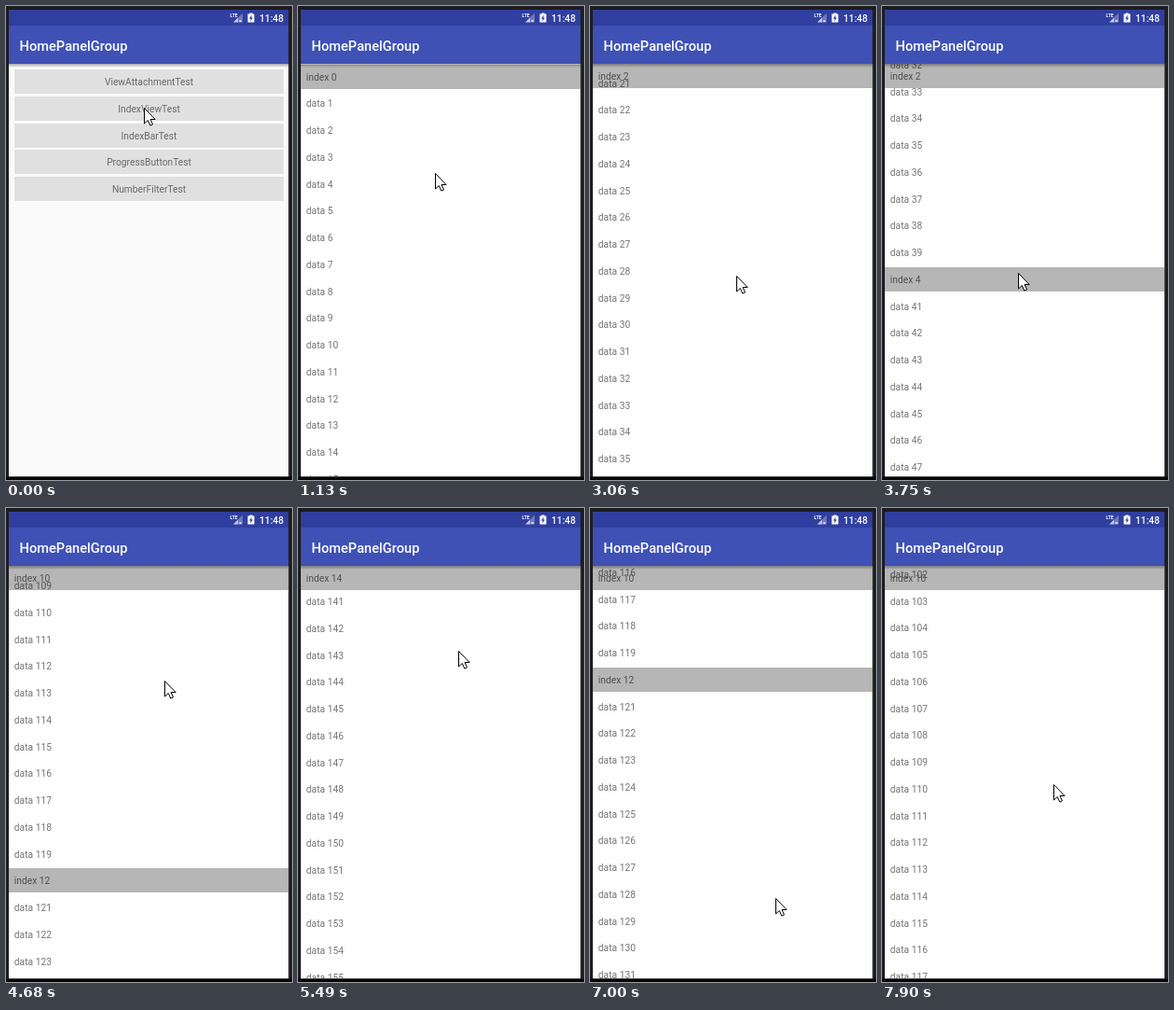
Recreate the animation shown at these times as an HTML page with a canvas. Size 307 by 508 pixels, loop 8000 ms.

```html
<!DOCTYPE html>
<html lang="en">
<head>
<meta charset="utf-8">
<title>Sticky index list</title>
<style>
  html, body { margin: 0; width: 100%; height: 100%; overflow: hidden; background: #1d1c20; }
  canvas { display: block; }
</style>
</head>
<body>
<canvas id="stage" width="307" height="508"></canvas>
<script>
const ctx = document.getElementById('stage').getContext('2d');
const LOOP = 8000, LEFT = 3, RIGHT = 303.5, TOP = 62, BOTTOM = 504.5, WIDTH = RIGHT - LEFT;
const PITCH = 28.75, ROW = 26, GROUP = 20, BASELINE = 17;
const BUTTONS = ['ViewAttachmentTest', 'IndexViewTest', 'IndexBarTest', 'ProgressButtonTest', 'NumberFilterTest'];

// The screen refreshes in bursts: start, end, number of gaps. Gaps are multiples of 30 ms.
const BURSTS = [
  [400, 820, 3], [1130, 1400, 2], [1830, 2760, 7], [2910, 3900, 7],
  [4020, 4950, 7], [5070, 6030, 7], [6310, 7240, 7], [7360, 7900, 4]
];
const ticks = [0];
for (const [start, end, gaps] of BURSTS) {
  for (let k = 0; k <= gaps; k++) ticks.push(start + 30 * Math.round((end - start) * k / gaps / 30));
}

// Time, list offset: a short drag, a long fling, a fling back
const SCROLL = [
  [1780, 0], [2370, 80.75], [2800, 470], [3450, 760], [3750, 932.75], [4680, 3126.25],
  [5490, 4029.25], [6030, 4240], [6250, 4240], [6970, 3341.75], [7900, 2937.25]
];
// Time, pointer x, pointer y
const POINTER = [
  [1000, 148, 109], [1400, 143, 393], [1780, 143, 393], [2370, 152, 296], [2750, 165, 178],
  [3350, 148, 390], [3750, 146, 286], [4020, 165, 185], [4680, 170, 185], [5490, 172, 153],
  [6250, 176, 150], [6970, 199, 418], [7200, 200, 488], [7900, 184, 296]
];

// Smooth curve through the keys that never overshoots them
function sample(keys, time, channel = 1) {
  const last = keys.length - 1;
  const t = Math.max(keys[0][0], Math.min(keys[last][0], time));
  const i = Math.max(0, keys.findIndex(key => key[0] >= t) - 1);
  const rate = n => n < 0 || n >= last ? 0
    : (keys[n + 1][channel] - keys[n][channel]) / (keys[n + 1][0] - keys[n][0]);
  const slope = n => {
    const before = rate(n - 1), after = rate(n);
    return before * after > 0 ? 2 * before * after / (before + after) : 0;
  };
  const a = keys[i], b = keys[i + 1], span = b[0] - a[0], p = (t - a[0]) / span, q = 1 - p;
  return a[channel] * q * q * (1 + 2 * p) + b[channel] * p * p * (3 - 2 * p)
    + span * p * q * (slope(i) * q - slope(i + 1) * p);
}

function rect(color, x, y, w, h) {
  ctx.fillStyle = color;
  ctx.fillRect(x, y, w, h);
}

function text(label, x, y, color, align = 'left', font = '10.25px') {
  ctx.font = font + ' Roboto, sans-serif';
  ctx.textAlign = align;
  ctx.fillStyle = color;
  ctx.fillText(label, x, y);
}

function polygon(color, ...points) {
  ctx.fillStyle = color;
  ctx.beginPath();
  for (const [x, y] of points) ctx.lineTo(x, y);
  ctx.closePath();
  ctx.fill();
}

function clipTo(top) {
  ctx.beginPath();
  ctx.rect(LEFT, top, WIDTH, BOTTOM - top);
  ctx.clip();
}

function page(background, content) {
  rect(background, LEFT, TOP, WIDTH, BOTTOM - TOP);
  ctx.save();
  clipTo(TOP);
  content();
  ctx.restore();
  const shadow = ctx.createLinearGradient(0, TOP, 0, TOP + 4);
  shadow.addColorStop(0, 'rgba(0,0,0,.32)');
  shadow.addColorStop(1, 'rgba(0,0,0,0)');
  rect(shadow, LEFT, TOP, WIDTH, 4);
  rect('#303f9f', LEFT, 4, WIDTH, 17);
  rect('#3f51b5', LEFT, 21, WIDTH, TOP - 21);
  text('HomePanelGroup', 14.5, 47.5, '#fff', 'left', '500 14.65px');
}

function menu(pressed) {
  BUTTONS.forEach((label, i) => {
    const y = Math.round(68 + i * PITCH);
    rect(pressed && i === 1 ? '#cacaca' : '#e0e0e0', 9, y, 289, ROW);
    text(label, 153.5, y + BASELINE, '#696969', 'center');
  });
}

function list(offset) {
  const rowTop = i => Math.round(TOP + 0.5 + i * PITCH - offset);
  const first = Math.floor(offset / PITCH);
  for (let i = first; i < first + 18; i++) {
    if (i % GROUP) text('data ' + i, 8.8, rowTop(i) + BASELINE, '#747474');
  }
  const group = Math.floor(first / GROUP);
  for (let g = group; g < group + 2; g++) {
    const pushed = Math.min(TOP, rowTop((g + 1) * GROUP) - ROW);
    const y = Math.max(rowTop(g * GROUP), pushed);
    rect('rgba(0,0,0,.285)', LEFT, y, WIDTH, ROW);
    text('index ' + g * 2, 8.8, y + BASELINE, '#505050');
  }
}

function statusIcons() {
  polygon('rgba(255,255,255,.3)', [244, 17.5], [254, 17.5], [254, 7.5]);
  polygon('rgba(255,255,255,.6)', [244, 17.5], [249, 17.5], [249, 12.5]);
  text('LTE', 240.5, 11.8, '#fff', 'left', '700 5px');
  text('×', 250, 18.2, '#fff', 'left', '700 6px');
  rect('#fff', 261.5, 7.5, 3, 2);
  rect('#fff', 259.5, 8.5, 7, 9);
  polygon('#303f9f', [263.7, 9.5], [261, 13.5], [262.6, 13.5], [262.3, 16.5], [265, 12.4], [263.4, 12.4]);
  text('11:48', 298, 17, '#fff', 'right', '500 10.25px');
}

function pointer(x, y) {
  ctx.save();
  ctx.translate(Math.round(x) + 0.5, Math.round(y) + 0.5);
  polygon('#fff', [0, 0], [0, 16.5], [3.8, 13], [6.3, 18.6], [9, 17.4], [6.5, 12], [11.6, 12]);
  ctx.strokeStyle = '#000';
  ctx.stroke();
  ctx.restore();
}

function draw(time) {
  rect('#1d1c20', 0, 0, 307, 508);
  rect('#060606', 0, BOTTOM, 307, 4);
  ctx.save();
  clipTo(4);
  const entry = Math.max(0, Math.min(1, (time - 450) / 370));
  if (entry < 1) page('#fafafa', () => menu(time >= 400));
  if (entry > 0) {
    ctx.globalAlpha = Math.min(1, entry * 1.9);
    ctx.translate(0, 40 * (1 - entry) ** 2);
    page('#fefefe', () => list(sample(SCROLL, time)));
  }
  ctx.restore();
  statusIcons();
  pointer(sample(POINTER, time, 1), sample(POINTER, time, 2));
}

function frame() {
  const now = performance.now() % LOOP;
  draw(ticks.filter(tick => tick <= now).pop());
  requestAnimationFrame(frame);
}
frame();
</script>
</body>
</html>
```
